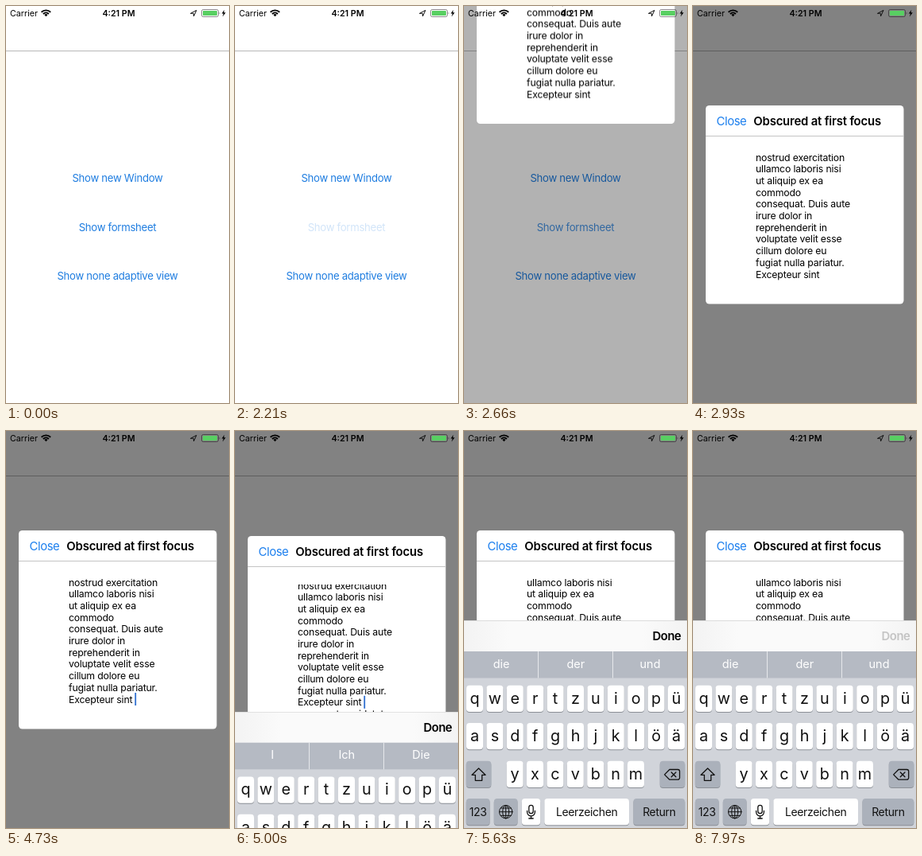
These frames come from a looping animation (281 by 499 pixels, 8000 ms). An HTML page:

```html
<!DOCTYPE html>
<html lang="en">
<head>
<meta charset="utf-8">
<title>Form sheet with keyboard</title>
<style>
html, body { margin: 0; width: 100%; height: 100%; overflow: hidden; background: #fff; }
svg { display: block; width: 281px; height: 499px; font-family: Inter, Roboto, sans-serif; }
.icon { fill: none; stroke: #111; stroke-width: 1.3; stroke-linecap: round; stroke-linejoin: round; }
.mid { text-anchor: middle; }
.semi { font-weight: 600; }
.status { font-size: 10.7px; }
.link { font-size: 13.17px; letter-spacing: -.022em; fill: #1f7de0; }
.nav { font-size: 14.9px; letter-spacing: -.028em; }
.title { letter-spacing: -.013em; }
.body { font-size: 12.3px; letter-spacing: -.014em; }
.hint { font-size: 14.5px; fill: #fff; }
.letter { font-size: 19.8px; fill: #111; }
.word { font-size: 14px; letter-spacing: -.025em; fill: #111; }

/* Paused animations, scrubbed through --now. */
.tap, .dim, .slide, .nudge, .scroll, .caret, .board, .early, .late, .done {
  animation: 8s linear var(--now, 0s) infinite paused;
}
.tap { animation-name: tap; }
.dim { animation-name: dim; }
.slide { animation-name: slide; }
.nudge { animation-name: nudge; }
.scroll { animation-name: scroll; }
.caret { animation-name: caret; }
.board { animation-name: board; }
.early { animation-name: early; }
.late { animation-name: late; }
.done { animation-name: done; }

@keyframes tap {
  0% { opacity: 1; animation-timing-function: step-end; }
  27.6%, 28.75% { opacity: .2; }
  34.5%, 100% { opacity: 1; }
}
@keyframes dim {
  0%, 30.6% { opacity: 0; animation-timing-function: ease-out; }
  36.6%, 100% { opacity: .49; }
}
@keyframes slide {
  0%, 32.06% { transform: translateY(-374px); animation-timing-function: ease-out; }
  36.6%, 100% { transform: none; }
}
@keyframes nudge {
  0%, 61.375% { transform: translateY(0); }
  62.5% { transform: translateY(7px); animation-timing-function: ease-out; }
  67%, 100% { transform: translateY(0); }
}
@keyframes scroll {
  0%, 61.375% { transform: translateY(0); }
  62.5% { transform: translateY(-3.2px); animation-timing-function: ease-out; }
  67%, 100% { transform: translateY(-14.67px); }
}
@keyframes caret {
  0% { opacity: 0; animation-timing-function: step-end; }
  59.1%, 100% { opacity: 1; }
}
@keyframes board {
  0%, 61.375% { transform: translateY(262px); animation-timing-function: cubic-bezier(.38, .7, .125, 1); }
  66.25%, 100% { transform: none; }
}
@keyframes early {
  0% { opacity: 1; animation-timing-function: step-end; }
  69.2%, 100% { opacity: 0; }
}
@keyframes late {
  0% { opacity: 0; animation-timing-function: step-end; }
  69.2%, 100% { opacity: 1; }
}
@keyframes done {
  0% { opacity: 1; animation-timing-function: step-end; }
  99.6%, 100% { opacity: .2; }
}
</style>
</head>
<body>
<svg viewBox="0 0 281 499">
  <defs>
    <clipPath id="view"><rect x="70" y="186" width="140" height="160"/></clipPath>
    <linearGradient id="bar">
      <stop stop-color="#f3f3f3"/>
      <stop offset=".2" stop-color="#fafafa"/>
      <stop offset=".8" stop-color="#fafafa"/>
      <stop offset="1" stop-color="#f3f3f3"/>
    </linearGradient>
  </defs>

  <rect width="281" height="499" fill="#fff"/>
  <path d="M0 56.5H281" stroke="#b8b8b8"/>
  <g class="link mid">
    <text x="140.5" y="220.5">Show new Window</text>
    <text class="tap" x="140.5" y="282.5">Show formsheet</text>
    <text x="140.5" y="344">Show none adaptive view</text>
  </g>
  <rect class="dim" width="281" height="499"/>

  <g class="slide"><g class="nudge">
    <rect x="16" y="125" width="249.5" height="249.5" rx="4.5" fill="#fff"/>
    <path d="M16 163.5H265.5" stroke="#c4c4c4"/>
    <text class="nav" x="29.5" y="149.7" fill="#1c7fee">Close</text>
    <text class="nav semi title" x="76.3" y="149.7">Obscured at first focus</text>
    <g clip-path="url(#view)"><g class="scroll">
      <g class="body" id="copy"></g>
      <rect class="caret" x="162.3" y="329" width="1.8" height="16" fill="#2f6fd0"/>
    </g></g>
  </g></g>

  <g class="status">
    <text x="5" y="12.8">Carrier</text>
    <text class="semi mid" x="142" y="12.8">4:21 PM</text>
    <g class="icon" style="stroke-width:1.9;stroke:#000;stroke-linecap:butt">
      <path d="M44.6 7.7a8.3 8.3 0 0 1 11.6 0M46.9 10a5 5 0 0 1 7 0"/>
    </g>
    <path d="M50.4 13.2L48.3 11.1a3 3 0 0 1 4.2 0Z"/>
    <path class="icon" style="stroke-width:1" d="M232.8 9.2L240 5.4L236.6 12.8L236.2 9.5Z"/>
    <rect x="246.5" y="4.5" width="21" height="9" rx="2" fill="none" stroke="#000" stroke-opacity=".45"/>
    <rect x="248" y="6" width="18" height="6" rx=".8" fill="#58cf62"/>
    <path d="M268.6 7.4a1.8 1.8 0 0 1 0 3.2Z" fill-opacity=".45"/>
    <path d="M275.3 4.8L271.8 9.6H274L272.9 13.4L276.8 8.3H274.5Z"/>
  </g>

  <g class="board">
    <rect y="238" width="281" height="262" fill="#d1d4da"/>
    <rect y="238" width="281" height="39" fill="url(#bar)"/>
    <path d="M0 238.5H281" stroke="#dcdcdc"/>
    <text class="nav semi done" x="273.5" y="263.2" text-anchor="end">Done</text>
    <rect y="277" width="281" height="33.5" fill="#b5bac3"/>
    <path d="M93.5 277V310.5M187.5 277V310.5" stroke="#e6e8eb"/>
    <g class="hint mid early" id="early"></g>
    <g class="hint mid late" id="late"></g>
    <g class="mid" id="keys"></g>
    <g class="icon">
      <path d="M18.5 424L27 432.3H22.7V439.3H14.3V432.3H10Z"/>
      <path d="M259 425.5H269.5a2.2 2.2 0 0 1 2.2 2.2V436a2.2 2.2 0 0 1-2.2 2.2H259L252.7 431.9Z
        M261.3 429L267 434.8M267 429L261.3 434.8"/>
      <g style="stroke-width:1">
        <circle cx="52.7" cy="478.7" r="8.2"/>
        <ellipse cx="52.7" cy="478.7" rx="4" ry="8.2"/>
        <path d="M52.7 470.5V486.9M44.5 478.7H60.9M46.3 474H59.1M46.3 483.4H59.1"/>
      </g>
      <rect x="81.8" y="470.3" width="5.4" height="10.4" rx="2.7"/>
      <path d="M79.6 477.5V479a4.9 4.9 0 0 0 9.8 0V477.5M84.5 484V487M81.8 487H87.2"/>
    </g>
  </g>
</svg>
<script>
const $ = id => document.getElementById(id);

function add(parent, tag, attrs, text = '') {
  const el = document.createElementNS('http://www.w3.org/2000/svg', tag);
  for (const k in attrs) el.setAttribute(k, attrs[k]);
  el.textContent = text;
  parent.append(el);
}

const lines = ['nostrud exercitation', 'ullamco laboris nisi', 'ut aliquip ex ea', 'commodo',
  'consequat. Duis aute', 'irure dolor in', 'reprehenderit in', 'voluptate velit esse',
  'cillum dolore eu', 'fugiat nulla pariatur.', 'Excepteur sint', 'occaecat cupidatat'];
lines.forEach((s, i) => add($('copy'), 'text', { x: 79, y: 194.8 + i * 14.67 }, s));

const hints = (id, words) => words.forEach((s, i) =>
  add($(id), 'text', { x: 47.1 + i * 93.7, y: 297.5 }, s));
hints('early', ['I', 'Ich', 'Die']);
hints('late', ['die', 'der', 'und']);

function key(x, y, width, label, cls = 'letter', fill = '#fff') {
  const box = { x, width, height: 33.3, rx: 4 };
  add($('keys'), 'rect', { ...box, y: y + 1, fill: '#8b8f96' });
  add($('keys'), 'rect', { ...box, y, fill });
  add($('keys'), 'text', { class: cls, x: x + width / 2, y: y + (cls === 'word' ? 21.8 : 23) }, label);
}
const row = (x, y, letters) => [...letters].forEach((c, i) => key(x + i * 25.4, y, 21, c));
const gray = '#abb1bb';

row(3, 319.7, 'qwertzuiopü');
row(3, 367, 'asdfghjklöä');
row(53.6, 414.7, 'yxcvbnm');
key(2.8, 414.7, 31.5, '', 'word', gray);
key(246.8, 414.7, 31.5, '', 'word', gray);
key(2.8, 462, 29.7, '123', 'word', gray);
key(37.8, 462, 29.7, '', 'word', gray);
key(72.8, 462, 23.4, '', 'word');
key(101.3, 462, 106.7, 'Leerzeichen', 'word');
key(213.5, 462, 64.8, 'Return', 'word', gray);

// The picture advances in 90 ms ticks after the first half second.
function draw() {
  const t = performance.now() % 8000;
  const tick = t < 500 ? 0 : 500 + Math.floor((t - 500) / 90) * 90;
  document.documentElement.style.setProperty('--now', -tick + 'ms');
  requestAnimationFrame(draw);
}
draw();
</script>
</body>
</html>
```
